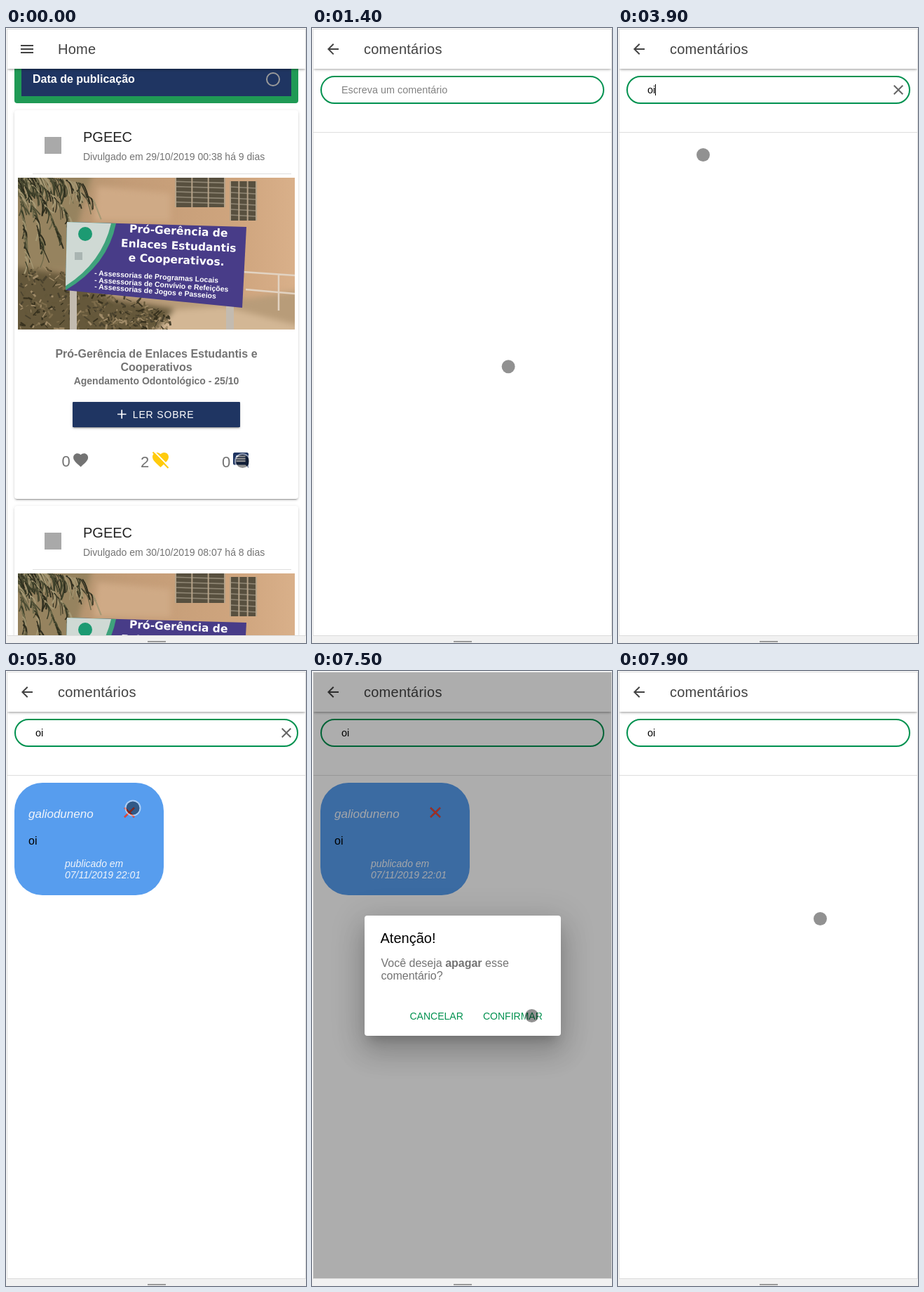
An HTML page for the animation above (8000 ms loop, 428 px wide and 875 px high).

```html
<!DOCTYPE html>
<html lang="pt">
<head>
<meta charset="utf-8">
<title>Comentários</title>
<style>
html, body { margin: 0; width: 100%; height: 100%; overflow: hidden; background: #fff; }
#stage { position: absolute; width: 428px; height: 875px; overflow: hidden; }
#stage div, svg { position: absolute; left: 0; top: 0; }
svg { overflow: visible; font-family: "Liberation Sans", Arial, sans-serif; white-space: pre; }
#stage #screen { left: 2px; top: 2px; width: 425px; height: 862px; overflow: hidden; background: #fff; }
#stage #view { left: -2px; top: -2px; }
.page { width: 428px; height: 875px; }
.bar { box-shadow: 0 2px 4px -1px #0004, 0 1px 3px #0003; }
.card, .button { border-radius: 4px; box-shadow: 0 3px 1px -2px #0003, 0 2px 2px #00000024, 0 1px 5px #0000001f; }
.button { border-radius: 1px; }
#alert { width: 428px; height: 875px; transform-origin: 215px 433.5px; }
.dialog { border-radius: 4px; box-shadow: 0 11px 15px -7px #0003, 0 24px 38px 3px #00000024, 0 9px 46px 8px #0000001f; }
.soft { filter: blur(4px); }
.leaves { filter: blur(.5px); }
</style>
</head>
<body>
<div id="stage"></div>
<script>
const NAVY = '#1f3562', GREEN = '#00914f', GRAY = '#737373';
const HEART = 'M12 21.35l-1.45-1.32C5.4 15.36 2 12.28 2 8.5 2 5.42 4.42 3 7.5 3c1.74 0 3.41.81 4.5 2.09C13.09 3.81 14.76 3 16.5 3 19.58 3 22 5.42 22 8.5c0 3.78-3.4 6.86-8.55 11.54z';
const NOTE = 'M22 4c0-1.1-.9-2-2-2H4c-1.1 0-2 .9-2 2v12c0 1.1.9 2 2 2h14l4 4zM18 14H6v-2h12zm0-3H6V9h12zm0-3H6V6h12z';
const CLOSE = 'M19 6.41L17.59 5 12 10.59 6.41 5 5 6.41 10.59 12 5 17.59 6.41 19 12 13.41 17.59 19 19 17.59 13.41 12z';
const BACK = 'M20 11H7.83l5.59-5.59L12 4l-8 8 8 8 1.41-1.41L7.83 13H20z';

const svg = s => `<svg width="428" height="875">${s}</svg>`;
const box = (x, y, w, h, cls = '', fill = '#fff') =>
  `<div class="${cls}" style="left:${x}px;top:${y}px;width:${w}px;height:${h}px;background:${fill}"></div>`;
const rect = (x, y, w, h, fill, more = '') =>
  `<rect x="${x}" y="${y}" width="${w}" height="${h}" fill="${fill}" ${more}/>`;
const text = (x, y, size, s, fill = GRAY, more = '') =>
  `<text x="${x}" y="${y}" font-size="${size}" fill="${fill}" ${more}>${s}</text>`;
const icon = (d, x, y, k, fill) => `<path d="${d}" transform="translate(${x} ${y}) scale(${k})" fill="${fill}"/>`;
const line = (d, color, w, more = '') => `<path d="${d}" stroke="${color}" stroke-width="${w}" fill="none" ${more}/>`;
const shape = (d, fill) => `<path d="${d}" fill="${fill}"/>`;
const BOLD = 'font-weight="700"', ITALIC = 'font-style="italic"', HEADING = BOLD + ' text-anchor="middle"';

let seed = 7;
const rnd = (a = 0, b = 1) => a + (b - a) * ((seed = seed * 16807 % 2147483647) / 2147483647);
const pick = list => list[Math.floor(rnd(0, list.length))];

function palm() {
  let s = '';
  for (const [x, y] of [[128, 246], [112, 222], [92, 272], [76, 300], [52, 322], [28, 340]])
    for (let i = 0; i < 34; i++) {
      const u = i / 34, px = 12 + (x - 12) * u, py = 210 + (y - 210) * u * u;
      s += line(`M${px} ${py}q${rnd(2, 9)} ${rnd(2, 8)} ${rnd(-2, 14)} ${rnd(12, 30)}`,
        pick(['#3a3d28', '#4d4d34', '#6f6a4b', '#2e2d1e', '#a59874']), rnd(1, 2.6));
    }
  return s;
}

function bush() {
  let s = '';
  for (let i = 0; i < 420; i++) {
    const x = rnd(17, 235), y = rnd(345 + Math.max(0, x - 75) * .4, 432);
    s += line(`M${x} ${y}l${rnd(-8, 8)} ${rnd(-8, 5)}`,
      pick(['#4a422e', '#635739', '#7d6c4b', '#38321f', '#a08b68']), rnd(1, 3));
  }
  return s;
}

function windowPane(x, y, w, h, rows) {
  let s = rect(x, y, w, h, '#58503f');
  for (let i = 1; i < rows; i++) s += line(`M${x} ${y + i * h / rows}l${w} 2`, '#8f8674', 1.6);
  for (let i = 0; i < 4; i++) s += line(`M${x + i * w / 3} ${y}v${h}`, '#b5a288', 2);
  return s;
}

function sign() {
  const big = 'font-family="DejaVu Sans, sans-serif" ' + HEADING;
  const row = (y, s, x = 246) => `<g transform="rotate(2.6 ${x} ${y})">${text(x, y, 15.5, s, '#fff', big)}</g>`;
  const small = (y, s, a) => `<g transform="rotate(${a} 126 ${y})">${text(126, y, 10.5, s, '#fff', BOLD)}</g>`;
  return rect(91, 372, 10, 58, '#c3bbb0') + rect(314, 392, 11, 40, '#c3bbb0')
    + shape('M87 276L343 283 337 398 85 373z', '#483c88')
    + shape('M87 276L157 278Q145 338 85 373z', '#3fa27c')
    + shape('M87 276L150 278Q137 334 85 367z', '#cfd9d4')
    + '<circle cx="113" cy="293" r="10" fill="#1c9a72"/>' + rect(98, 319, 11, 11, '#a9b5b2')
    + row(294, 'Pró-Gerência de') + row(315, 'Enlaces Estudantis') + row(335, 'e Cooperativos.', 243)
    + small(352, '- Assessorias de Programas Locais', 3.4)
    + small(362, '- Assessorias de Convívio e Refeições', 4)
    + small(371, '- Assessorias de Jogos e Passeios', 4.6);
}

const photo = `<g clip-path="url(#crop)">
  ${rect(17, 213, 395, 216, 'url(#wall)')}
  <g class="soft">
    ${shape('M0 200H125L105 270 90 345H0z', '#96835f')}
    ${shape('M130 225L235 235V275H125z', '#cfaa86')}
    ${shape('M85 365L345 385 425 372V445H85z', '#b89c79')}
    ${shape('M190 405L310 396 425 425V445H150z', '#d3b795')}
    ${shape('M0 340L90 350 150 385 240 400 200 445H0z', '#65583b')}
  </g>
  ${windowPane(242, 211, 70, 44, 6)}${windowPane(320, 218, 37, 56, 7)}
  ${line('M338 347L412 352M342 372L412 378M389 350V402', '#e2d3c2', 2.5)}
  <g class="leaves">${palm()}${bush()}</g>${sign()}</g>`;

const card = (dy, when) => `<div style="top:${dy}px">${box(12, 117, 405, 553, 'card')}${box(95, 532, 239, 36, 'button', NAVY)}${svg(
  rect(55, 155, 24, 24, '#a9a9a9')
  + text(110, 162, 20, 'PGEEC', '#222') + text(110, 188, 14, 'Divulgado em ' + when)
  + rect(38, 207, 369, 1, '#dedede') + photo
  + text(214.5, 469, 16, 'Pró-Gerência de Enlaces Estudantis e', GRAY, HEADING)
  + text(214.5, 488, 16, 'Cooperativos', GRAY, HEADING)
  + text(214.5, 507, 14, 'Agendamento Odontológico - 25/10', GRAY, HEADING)
  + line('M159 549.5h12.5M165.2 543.2v12.5', '#fff', 1.7)
  + text(180.8, 555, 14, 'LER SOBRE', '#fff', 'letter-spacing=".84"')
  + text(79.5, 624, 22, '0') + icon(HEART, 94, 602, 1.05, GRAY)
  + text(192, 625, 22, '2') + icon(HEART, 206.7, 600.5, 1.15, '#ffcb0d')
  + line('M211 602L233.5 625', '#fff', 2) + line('M209.5 603.5L231.5 626', '#ffcb0d', 2)
  + text(308, 625, 22, '0') + icon(NOTE, 321.8, 601.8, 1.1, NAVY))}</div>`;

const bar = (title, mark) => box(2, 2, 425, 56, 'bar')
  + svg(mark + text(74, 37, 20, title, '#424242', 'letter-spacing=".25"'));

const home = svg(rect(12, 40, 405, 67, '#1f9a55', 'rx="4"') + rect(22, 40, 385, 57, NAVY)
    + text(38, 78, 16, 'Data de publicação', '#fff', BOLD)
    + '<circle cx="381" cy="73" r="9" fill="none" stroke="#9a9a9a" stroke-width="2"/>')
  + card(0, '29/10/2019 00:38 há 9 dias') + card(563, '30/10/2019 08:07 há 8 dias')
  + bar('Home', line('M21 25h18M21 30h18M21 35h18', '#424242', 2));

const CROSS = 'M169 194.5l14 13.5M183 194.5l-14 13.5';
const bubble = rect(12, 159, 213, 160, '#579dee', 'rx="40"')
  + text(32, 209, 17, 'galioduneno', '#f0f4fa', ITALIC) + text(32, 247, 16, 'oi', '#000')
  + text(84, 279, 14, 'publicado em', '#f0f4fa', ITALIC)
  + text(84, 295, 14, '07/11/2019 22:01', '#f0f4fa', ITALIC)
  + line(CROSS, '#6b3a48', 2.6, 'stroke-opacity=".5"') + line(CROSS, '#f8402a', 1.8);

const comments = bar('comentários', icon(BACK, 18, 18, 1, '#424242')) + svg(
  rect(13, 69, 403, 38, '#fff', `rx="19" stroke="${GREEN}" stroke-width="2"`)
  + '<text id="field" x="42" y="93" font-size="14.4"></text>'
  + rect(42, 80, 1, 16, '#000', 'id="caret"')
  + `<g id="clear">${icon(CLOSE, 388, 76, 1, '#666')}</g>`
  + rect(2, 148, 425, 1, '#dedede') + `<g id="bubble">${bubble}</g>`);

const dialog = box(75, 348, 280, 171, 'dialog') + svg(
  text(97.5, 387, 20, 'Atenção!', '#000')
  + text(98.5, 421, 16, 'Você deseja <tspan font-weight="700">apagar</tspan> esse')
  + text(98.5, 439, 16, 'comentário?')
  + text(139.5, 496, 14, 'CANCELAR', GREEN) + text(244, 496, 14, 'CONFIRMAR', GREEN));

const defs = `<clipPath id="crop">${rect(17, 213, 395, 216, '#000')}</clipPath>
  <linearGradient id="wall"><stop stop-color="#a98f6b"/><stop offset=".4" stop-color="#c39c77"/>
  <stop offset=".8" stop-color="#cfa57e"/><stop offset="1" stop-color="#d9b08a"/></linearGradient>`;

const $ = id => document.getElementById(id);
$('stage').innerHTML = svg(defs
    + rect(0, 865, 428, 10, '#f1f1f1') + rect(1, 1, 427, 864, '#dcdcdc') + rect(202, 872, 26, 2, '#9a9a9a'))
  + `<div id="screen"><div id="view">
    <div class="page">${home}</div>
    <div class="page" id="comments" style="background:#fff">${comments}</div>
    <div class="page" id="shade" style="background:#000"></div>
    <div id="alert">${dialog}</div>
    ${svg('<g id="touch"><circle r="10.5" fill="none" stroke="#fff" stroke-opacity=".5" stroke-width="2"/><circle r="9.5" fill="#000" fill-opacity=".43"/></g>')}
  </div></div>`;

// time, x, y of the touch point
const path = [[0, 337.5, 616.5], [200, 334.5, 615], [1200, 334.5, 615], [2000, 117, 82], [2100, 117, 82],
  [2400, 115.5, 88.5], [3000, 115.5, 88.5], [3100, 121.5, 180.5], [5000, 121.5, 180.5], [5100, 122.5, 180.5],
  [5200, 122.5, 180.5], [5600, 181.5, 197.5], [5700, 181.5, 197.5], [5800, 181, 195], [6000, 177, 201],
  [6100, 177, 201], [7000, 319, 460], [7500, 313.5, 490.5], [7600, 313.5, 490.5], [7900, 288.5, 352.5], [8000, 288.5, 352.5]];
// start, end, x of the visible caret
const blinks = [[2400, 3100, 42], [3500, 3700, 42], [3700, 3900, 50], [3900, 4500, 53], [4800, 5300, 53], [5900, 6200, 53]];

const clamp = v => Math.min(1, Math.max(0, v));
const show = (id, on) => $(id).style.display = on ? '' : 'none';

function draw(t) {
  const enter = 1 - (1 - clamp((t - 1150) / 280)) ** 3;
  $('comments').style.opacity = enter;
  $('comments').style.transform = `translateY(${40 * (1 - enter)}px)`;

  $('field').textContent = t < 3700 ? 'Escreva um comentário' : t < 3900 ? 'o' : 'oi';
  $('field').setAttribute('fill', t < 3700 ? '#828282' : '#000');
  const blink = blinks.find(b => t >= b[0] && t < b[1]);
  show('caret', blink);
  if (blink) $('caret').setAttribute('x', blink[2]);
  show('clear', t >= 3700 && t < 6200);
  show('bubble', t >= 4500 && t < 7800);

  const open = clamp((t - 6125) / 150), shown = open * clamp((7800 - t) / 200);
  $('shade').style.opacity = .32 * shown;
  $('alert').style.opacity = shown;
  $('alert').style.transform = `scale(${.9 + .1 * open})`;

  const i = path.findIndex(p => p[0] > t), [a, x, y] = path[i - 1], [b, x2, y2] = path[i];
  const u = (t - a) / (b - a);
  $('touch').setAttribute('transform', `translate(${x + (x2 - x) * u} ${y + (y2 - y) * u})`);
}

const start = performance.now();
function tick() {
  const t = (performance.now() - start) % 8000;
  draw(Math.floor(t / 100) * 100); // ten steps a second
  requestAnimationFrame(tick);
}
tick();
</script>
</body>
</html>
```
